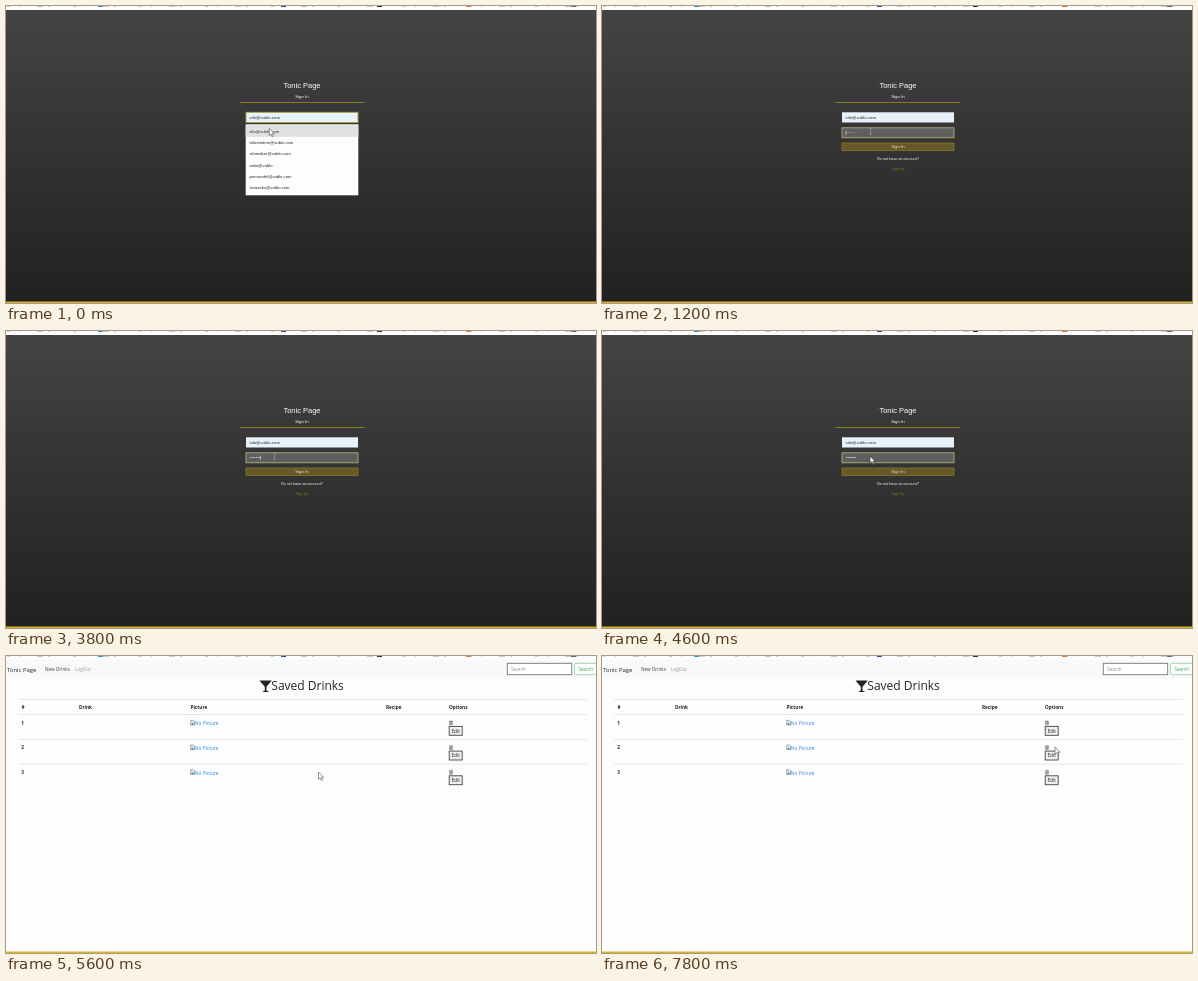
Recreate the animation shown at these times as an HTML page. Size 590 px wide and 297 px high, loop 8000 ms.

```html
<!DOCTYPE html>
<html lang="en">
<head>
<meta charset="utf-8">
<title>Sign in and saved drinks</title>
<style>
  html, body { margin: 0; width: 100%; height: 100%; overflow: hidden; background: #fefdfe; }
  svg { display: block; width: 590px; height: 297px; }
  #login { font: 4.3px "Liberation Sans", Arial, sans-serif; fill: #fff; }
  #list { font: 4.7px "Open Sans", "Noto Sans", sans-serif; fill: #212529; }
  .mid { text-anchor: middle; }
  .dark { fill: #222; }
  .bold { font-weight: 700; }
</style>
</head>
<body>
<svg viewBox="0 0 590 297">
  <defs>
    <linearGradient id="night" x2="0" y2="1">
      <stop stop-color="#444445"/>
      <stop offset="1" stop-color="#222021"/>
    </linearGradient>
    <path id="arrow" d="M0 0V7.2L1.7 5.7L2.9 8.4L4.1 7.9L2.9 5.3H5.1Z" stroke-width=".7"/>
    <path id="beam" d="M-1.2 -3H-.3L0 -2.7L.3 -3H1.2M0 -2.7V2.7M-1.2 3H-.3L0 2.7L.3 3H1.2" fill="none" stroke-width=".7"/>
  </defs>

  <rect width="590" height="297" fill="#fefdfe"/>

  <g id="login">
    <rect y="4" width="590" height="293" fill="url(#night)"/>
    <g class="mid">
      <text x="296" y="82" font-size="7.5">Tonic Page</text>
      <text x="296" y="91.5">Sign In</text>
    </g>
    <path d="M233.5 96.5H358.5" stroke="#85801c"/>
    <rect id="mail" x="240" y="106.3" width="112" height="10.2" fill="#e8f2fb"/>
    <text class="dark" x="243.6" y="113">silo@vublo.com</text>

    <g id="form">
      <rect id="pass" x="240" y="121.8" width="112" height="10"/>
      <text id="dots" x="243.8" y="128.4"></text>
      <path id="caret" stroke="#ddd" stroke-width=".6"/>
      <rect x="240" y="137" width="112" height="7.5" fill="#675927" stroke="#857528" stroke-width=".8"/>
      <g class="mid">
        <text x="296" y="142.4" fill="#eee9d8">Sign In</text>
        <text x="296" y="154.2" font-size="3.75">Do not have an account?</text>
        <text x="296" y="163.5" font-size="3.6" fill="#8b7428">Sign Up</text>
      </g>
    </g>

    <g id="menu" font-size="4.2">
      <rect x="239.7" y="118.3" width="112.6" height="71" fill="#fdfdfd"/>
      <rect x="239.7" y="119.3" width="112.6" height="11.6" fill="#e1e1e1"/>
    </g>
  </g>

  <g id="list">
    <rect y="4" width="590" height="18.2" fill="#f8f9fa"/>
    <text x="1" y="15.5" font-size="5.95">Tonic Page</text>
    <text x="39" y="15" fill="#444">New Drinks</text>
    <text x="69" y="15" fill="#999">LogOut</text>
    <rect x="501.3" y="7.3" width="64.4" height="11.4" fill="#fff" stroke="#777" stroke-width=".9"/>
    <text x="505" y="14.8" fill="#8b9096">Search</text>
    <rect x="568.5" y="7.3" width="23" height="11.4" rx="1.4" fill="#fbfdfb" stroke="#8fcda0" stroke-width=".8"/>
    <text x="572.4" y="14.8" fill="#3fae59">Search</text>
    <path d="M253.5 24.6H265.8L260.5 30.7V34.6L263.3 36H256L258.8 34.6V30.7Z"/>
    <text x="265.3" y="34.4" font-size="12" font-weight="500">Saved Drinks</text>
    <path d="M12 43.3H581M12 58.5H581M12 83.4H581M12 108.2H581" stroke="#dee2e6" stroke-width=".8"/>
  </g>

  <rect y="295.5" width="590" height="1.5" fill="#d6b628"/>
  <path d="M1 .3H590" stroke="#aaa" stroke-width=".7" stroke-dasharray="3 9 1 17 6 5 2 23"/>
  <g id="tabs"></g>

  <use id="ghost" href="#arrow" transform="translate(403 91) scale(.72)" fill="#fff" stroke="#555"/>
  <use id="pointer" href="#arrow"/>
  <use id="ibeam" href="#beam" x="268.6" y="125.3"/>
</svg>
<script>
const $ = id => document.getElementById(id);
const add = (id, markup) => $(id).insertAdjacentHTML('beforeend', markup);
const show = (id, on) => $(id).style.display = on ? '' : 'none';
const set = (id, attrs) => {
  for (const name in attrs) $(id).setAttribute(name, attrs[name]);
};

['silo@vublo.com', 'tolmetolme@vublo.com', 'silomaker@vublo.com',
 'salut@vublo', 'pernondel@vublo.com', 'tirvaseko@vublo.com'].forEach((mail, i) =>
  add('menu', `<text class="dark" x="243.5" y="${126.7 + i * 11.3}">${mail}</text>`));

[['#', 15.5], ['Drink', 73], ['Picture', 184.5], ['Recipe', 380], ['Options', 443]].forEach(([name, x]) =>
  add('list', `<text class="bold" x="${x}" y="53">${name}</text>`));

for (let i = 0; i < 3; i++) add('list', `<g transform="translate(0 ${i * 24.7})">
  <text class="bold" x="15.3" y="68.8">${i + 1}</text>
  <path d="M184.7 64.3H187.4L188.6 65.5V69H184.7Z" fill="#dceafa" stroke="#6c7f91" stroke-width=".6"/>
  <path d="M185 68.7L186.5 66.8L188.3 68.7Z" fill="#4c9d49"/>
  <text x="188.8" y="69.4" font-size="4.9" fill="#2c87df">No Picture</text>
  <path d="M443.3 65.5H446.7M444.4 64.8H445.6M443.7 65.5V68.8H446.3V65.5M444.6 66.3V68M445.4 66.3V68" fill="none" stroke="#333" stroke-width=".5"/>
  <rect x="443.2" y="70.4" width="13" height="8.9" fill="#efefef" stroke="#444" stroke-width=".9"/>
  <text x="445.4" y="76.8" font-size="4.8">Edit</text>
</g>`);

[[92, '#3f8fd2'], [275, '#2947b8'], [371, '#333'], [460, '#ee7444'], [565, '#667']].forEach(([x, color]) =>
  add('tabs', `<rect x="${x}" width="5" height="1" fill="${color}"/>`));

// Pointer path on the list page: time, x, y
const path = [[5400, 285, 122], [5800, 340, 110], [6200, 403, 91], [6400, 419, 77],
  [6800, 446, 64], [7200, 462, 58], [7600, 448, 78], [7800, 453, 91]];

function pointerAt(t) {
  const i = path.findIndex(p => p[0] > t);
  if (i < 0) return path.at(-1).slice(1);
  const [t0, x0, y0] = path[i - 1], [t1, x1, y1] = path[i];
  const k = (t - t0) / (t1 - t0);
  return [x0 + (x1 - x0) * k, y0 + (y1 - y0) * k];
}

function draw(t) {
  const login = t < 4800, open = t < 200;
  show('login', login);
  show('list', !login);
  show('menu', open);
  show('form', !open);
  set('mail', { stroke: t < 400 ? '#a8a23c' : 'none', 'stroke-width': .9 });

  const focus = Math.min(1, Math.max(0, (t - 400) / 800));
  const mix = (a, b) => Math.round(a + (b - a) * focus);
  set('pass', {
    fill: `rgb(${mix(104, 94)},${mix(104, 94)},${mix(104, 94)})`,
    stroke: `rgb(${mix(112, 190)},${mix(112, 184)},${mix(110, 118)})`,
    'stroke-width': .8
  });

  const hint = t < 2200;
  const typed = t < 2400 ? 0 : t < 2800 ? 1 : Math.min(7, 1 + Math.floor((t - 2800) / 166));
  $('dots').textContent = '•'.repeat(hint ? 6 : typed);
  set('dots', { 'fill-opacity': hint ? .35 : .9 });
  const caretX = 244 + typed * 1.5;
  set('caret', { d: `M${caretX} 124.6V129.2` });
  show('caret', t >= 400 && t < 4200);

  const arrow = open || (t >= 4600 && t < 4800) || t >= 5400;
  const [x, y] = open ? [263.3, 122.3] : login ? [268, 125] : t >= 5400 ? pointerAt(t) : [0, 0];
  show('pointer', arrow);
  show('ibeam', !arrow);
  show('ghost', t >= 6400 && t < 6600);
  const white = login && !open;
  set('pointer', { transform: `translate(${x} ${y})`, fill: '#fff', stroke: white ? '#333' : '#666' });
  set('ibeam', { stroke: login ? '#a5a5a5' : '#444' });
}

function frame() {
  const t = performance.now() % 8000;
  draw(Math.floor(t / 200) * 200);
  requestAnimationFrame(frame);
}
frame();
</script>
</body>
</html>
```
